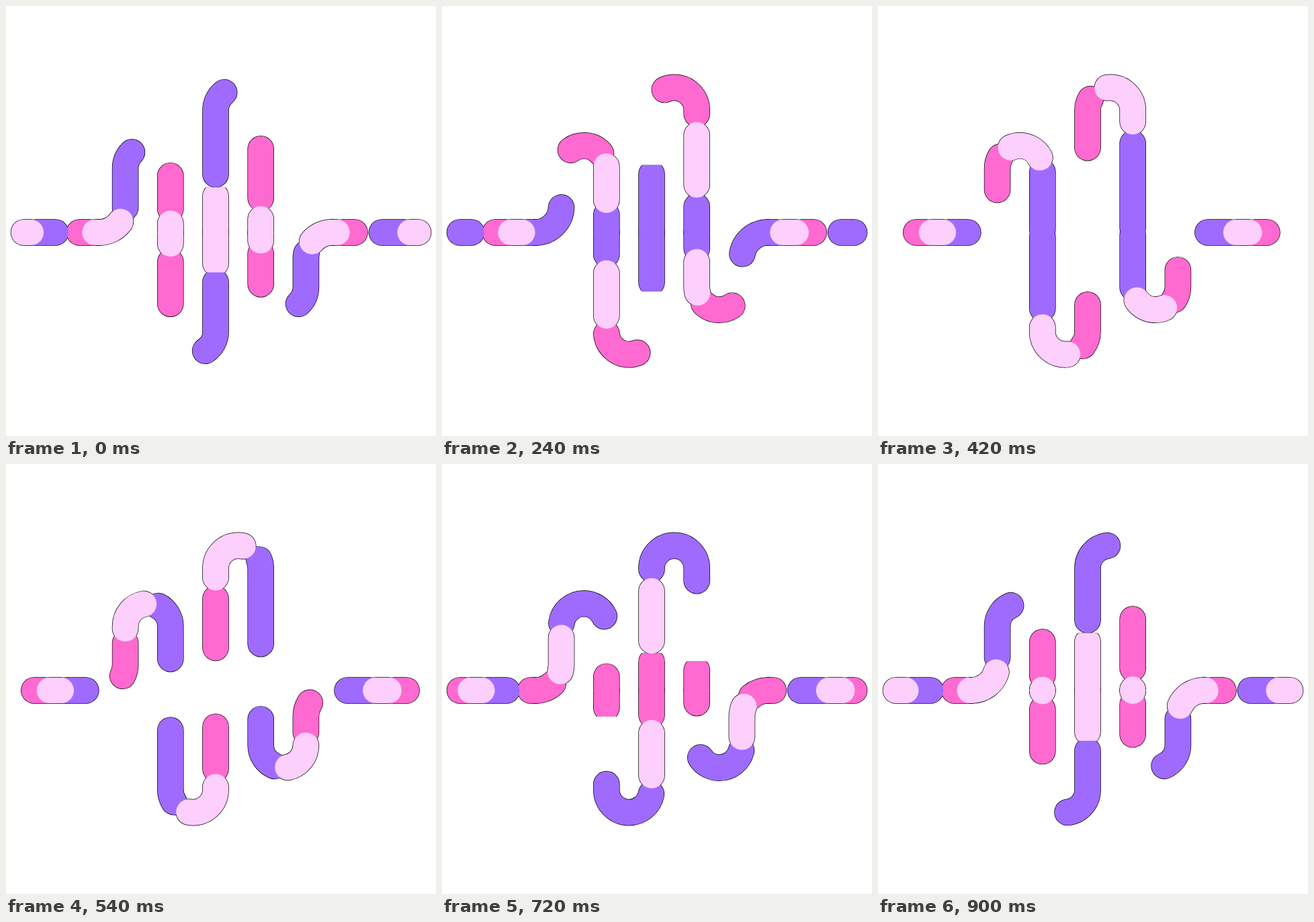
Write an HTML page with a canvas that moves like this. It is 640 px wide and 640 px high and loops after 930 ms.

```html
<!DOCTYPE html>
<html lang="en">
<head>
<meta charset="utf-8">
<title>Wave</title>
<style>
  html, body { margin: 0; width: 100%; height: 100%; overflow: hidden; background: #fff; }
  canvas { display: block; width: 640px; height: 640px; }
</style>
</head>
<body>
<canvas id="stage" width="640" height="640"></canvas>
<script>
const ctx = document.getElementById('stage').getContext('2d');
const LOOP = 930, STEP = 30, CYCLE = 900;
const MID = 337, R = 33.6, BEND = 38.6, CAP_CUT = 13;
const X = [0, 1, 2, 3, 4].map(i => 177.6 + 67.2 * i);
const HALF = Math.PI * R, QUARTER = Math.PI * BEND / 2;

// Arc centre heights of the four turns
const TOP1 = 241.4, LOW1 = 485, TOP2 = 155, LOW2 = 418.5;

const route = (d, length, side = 0, straight = 0) =>
  ({ shape: new Path2D(d), length, side, straight });

// Colour flows out of the second and fourth columns
const inner = [
  route(`M${X[1]} ${MID}V${TOP1}A${R} ${R} 0 0 0 ${X[0]} ${TOP1}V${MID - BEND}A${BEND} ${BEND} 0 0 1 ${X[0] - BEND} ${MID}`,
    MID - TOP1 + HALF + MID - BEND - TOP1 + QUARTER),
  route(`M${X[1]} ${MID}V${LOW1}A${R} ${R} 0 0 0 ${X[2]} ${LOW1}V${MID}`,
    2 * (LOW1 - MID) + HALF, 1, LOW1 - MID),
  route(`M${X[3]} ${MID}V${TOP2}A${R} ${R} 0 0 0 ${X[2]} ${TOP2}V${MID}`,
    2 * (MID - TOP2) + HALF, -1, MID - TOP2),
  route(`M${X[3]} ${MID}V${LOW2}A${R} ${R} 0 0 0 ${X[4]} ${LOW2}V${MID + BEND}A${BEND} ${BEND} 0 0 1 ${X[4] + BEND} ${MID}`,
    LOW2 - MID + HALF + LOW2 - MID - BEND + QUARTER)
];
const tailL = X[0] - BEND, tailR = X[4] + BEND;
const outer = [
  route(`M${tailL} ${MID}H26.5`, tailL - 26.5),
  route(`M${tailR} ${MID}H613.5`, 613.5 - tailR)
];

// Start and end delays of each band, in ms behind the leading edge
const bands = [
  { color: '#ff6ad0', inner: [0, 140], outer: [0, 125], leads: true },
  { color: '#9f6bff', inner: [404, 645], outer: [382, 617] },
  { color: '#fdcffc', inner: [200, 342], outer: [185, 322] }
];
const LEAD = 662;

// The flow slows a little before the loop closes
function phaseAt(t) {
  if (t < 780) return t;
  if (t < 900) return 780 + (t - 780) * 85 / 120;
  return 865 + (t - 900) * 35 / 30;
}

function collect(list, r, band, [head, tail], phase) {
  for (let n = 0; n < 3; n++) {
    const age = phase - LEAD + n * CYCLE;
    const b = (age - head) / CYCLE * r.length;
    const a = (age - tail) / CYCLE * r.length;
    if (b < 0 || a >= r.length) continue;
    const from = Math.max(a, 0), to = Math.min(b, r.length);
    let cut = null;
    if (r.side) {
      if (b >= r.length && from > r.length - r.straight) {
        cut = MID + r.side * (r.length - from + CAP_CUT);
      } else if (band.leads && to < 75) {
        cut = MID + r.side * (to + CAP_CUT);
      }
    }
    list.push({ r, from, to, cut, color: band.color });
  }
}

function stroke({ r, from, to, cut }, color, width) {
  ctx.save();
  if (cut !== null) {
    ctx.beginPath();
    ctx.rect(0, r.side > 0 ? 0 : cut, 640, r.side > 0 ? cut : 640 - cut);
    ctx.clip();
  }
  ctx.strokeStyle = color;
  ctx.lineWidth = width;
  ctx.lineCap = 'round';
  ctx.setLineDash([Math.max(to - from, 0.1), 2000]);
  ctx.lineDashOffset = -Math.min(from, r.length - 0.1);
  ctx.stroke(r.shape);
  ctx.restore();
}

function draw(t) {
  const phase = phaseAt(t), list = [];
  for (const band of bands) {
    for (const r of inner) collect(list, r, band, band.inner, phase);
    for (const r of outer) collect(list, r, band, band.outer, phase);
  }
  ctx.fillStyle = '#fff';
  ctx.fillRect(0, 0, 640, 640);
  for (const s of list) stroke(s, '#000', 39.6);
  for (const s of list) stroke(s, s.color, 38.2);
}

const start = performance.now();
function tick() {
  const t = (performance.now() - start + 8) % LOOP;
  draw(Math.floor(t / STEP) * STEP);
  requestAnimationFrame(tick);
}
tick();
</script>
</body>
</html>
```
